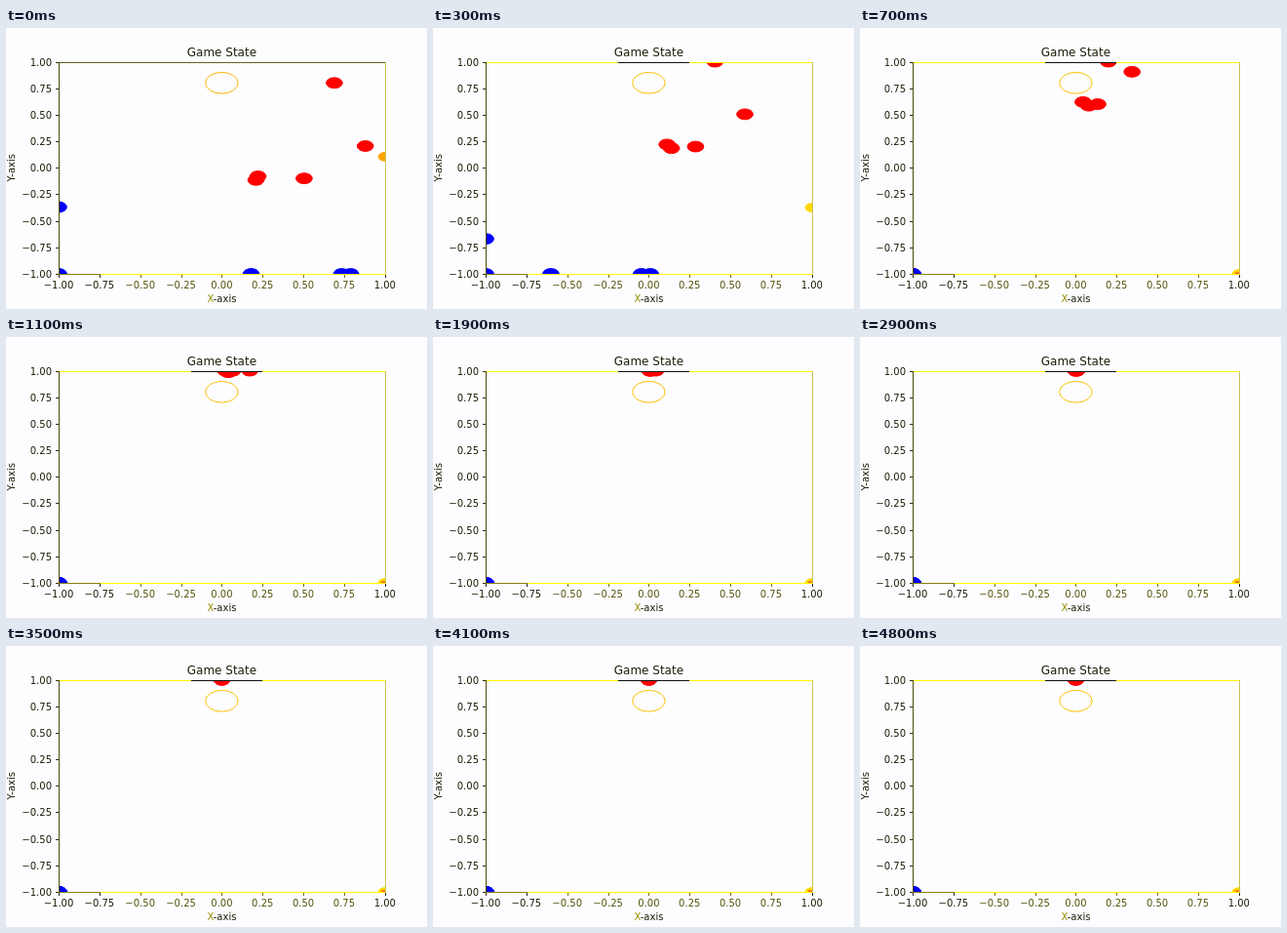
Write an HTML page that moves like this. It is 432 px wide and 288 px high and loops after 4.9 s.

```html
<!DOCTYPE html>
<html lang="en">
<head>
<meta charset="utf-8">
<title>Game State</title>
<style>
  html, body { margin: 0; width: 100%; height: 100%; overflow: hidden; background: #fdfdff; }
  svg { display: block; width: 432px; height: 288px; }
  text { font: 10px "DejaVu Sans", Verdana, sans-serif; fill: #1c1c06; }
  .title { font-size: 12px; }
  .mid { text-anchor: middle; }
  .end { text-anchor: end; }
  .warm { fill: #55530c; }
  .lines { shape-rendering: crispEdges; }
  .red { fill: #f00; stroke: #f00; }
  .blue { fill: #00f; stroke: #00f; }
</style>
</head>
<body>
<svg viewBox="0 0 432 288">
  <clipPath id="area"><rect x="54" y="35" width="335" height="217.5"/></clipPath>
  <g id="balls" clip-path="url(#area)"></g>
  <g class="lines">
    <rect id="top" x="54" y="35" width="335" height="1"/>
    <rect id="topDark" x="190" y="35" width="73" height="1" fill="#111"/>
    <rect x="389" y="35" width="1" height="218" fill="#c8c250"/>
    <rect x="54" y="35" width="1" height="218" fill="#4c4a08"/>
    <rect x="54" y="252" width="43" height="1" fill="#88820a"/>
    <rect x="97" y="252" width="293" height="1" fill="#fffa00"/>
  </g>
  <g id="ticks" class="lines"></g>
  <g id="labels"></g>
  <text class="title mid" x="221.4" y="29">Game State</text>
  <text class="mid" x="221.4" y="281"><tspan fill="#968e00">X</tspan>-axis</text>
  <text class="mid" transform="translate(9 143.3) rotate(-90)">Y-axis</text>
</svg>
<script>
const STEP = 100, LOOP = 4900, CLIMB = 7;
const px = x => 54 + (x + 1) * 167.4;
const py = y => 252 - (y + 1) * 108.72;
const clamp = v => Math.max(-1, Math.min(1, v));
const byId = id => document.getElementById(id);

function add(parent, tag, attrs, label) {
  const el = document.createElementNS("http://www.w3.org/2000/svg", tag);
  for (const k in attrs) el.setAttribute(k, attrs[k]);
  if (label) el.textContent = label;
  return byId(parent).appendChild(el);
}

function oval(r, attrs) {
  return add("balls", "ellipse", { rx: r * 167.4, ry: r * 108.72, ...attrs });
}

function place(el, x, y) {
  el.setAttribute("cx", px(clamp(x)));
  el.setAttribute("cy", py(clamp(y)));
}

for (let i = 0; i <= 8; i++) {
  const v = i / 4 - 1;
  const label = v.toFixed(2).replace("-", "\u2212");
  const x = Math.round(px(v)), y = Math.round(py(v));
  const warm = i > 1 && i < 8 ? " warm" : "";
  add("ticks", "rect", { x, y: 253, width: 1, height: 3, fill: warm ? "#77700a" : "#222" });
  add("ticks", "rect", { x: 51, y, width: 3, height: 1, fill: "#33320c" });
  add("labels", "text", { class: "mid" + warm, x: px(v), y: 267 }, label);
  add("labels", "text", { class: "end", x: 47, y: y + 4 }, label);
}

// start x, start y, x after the climb, later decay
const reds = [
  [0.69, 0.8, 0.2, 0.75],
  [0.88, 0.205, 0.345, 0.84],
  [0.505, -0.1, 0.135, 0.84],
  [0.21, -0.115, 0.08, 0.84],
  [0.222, -0.08, 0.045, 0.84]
].map(([x, y, mid, decay]) => ({ x, y, mid, decay, el: oval(0.05, { class: "red" }) }));

const blues = [[-1, -0.37], [-1, -1], [0.18, -1], [0.735, -1], [0.79, -1]]
  .map(([x, y]) => ({ x, y, el: oval(0.05, { class: "blue" }) }));

const goal = oval(0.1, { fill: "none" });
place(goal, 0, 0.8);
const ball = oval(0.04, {});
const glow = add("balls", "rect", { x: 385, y: 250.5, width: 4, height: 2, fill: "#ff5828" });

function draw(n) {
  for (const r of reds) {
    const x = n < CLIMB
      ? r.x * (r.mid / r.x) ** (n / CLIMB)
      : r.mid * r.decay ** (n - CLIMB);
    place(r.el, x, r.y + 0.1 * n);
  }
  for (const b of blues) place(b.el, b.x - 0.26 * n, b.y - 0.1 * n);
  place(ball, 1, 0.105 - 0.16 * n);
  const tone = n ? "#ffd800" : "#ffa500";
  ball.setAttribute("fill", tone);
  ball.setAttribute("stroke", tone);
  goal.setAttribute("stroke", n ? "#fcc000" : "#ffb000");
  glow.style.display = n < CLIMB ? "none" : "";
  byId("top").setAttribute("fill", n ? "#fff400" : "#666020");
  byId("topDark").style.display = n ? "" : "none";
}

const start = performance.now();
function tick(now) {
  draw(Math.floor((Math.max(0, now - start) % LOOP) / STEP));
  requestAnimationFrame(tick);
}
draw(0);
requestAnimationFrame(tick);
</script>
</body>
</html>
```
